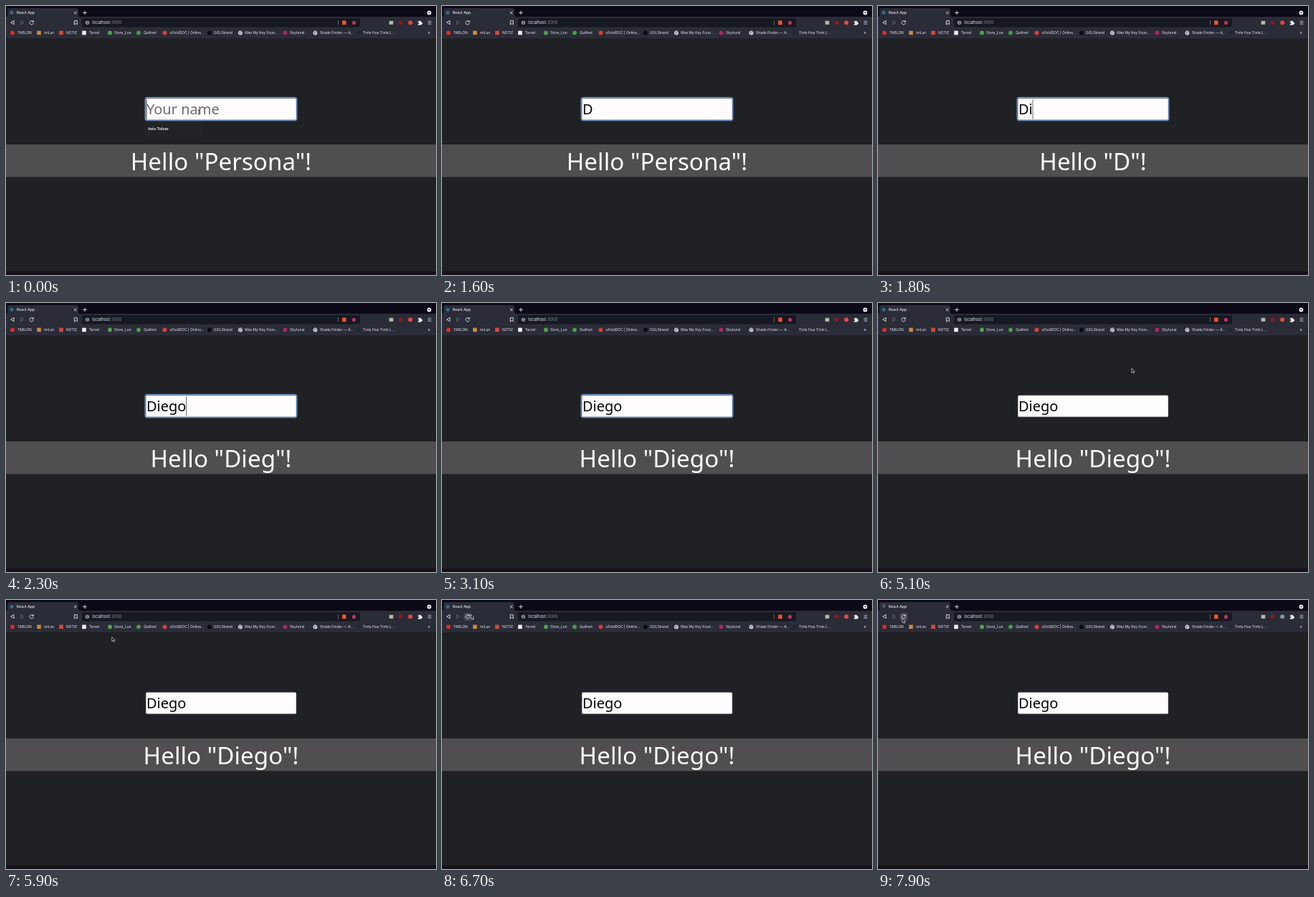
Animation, 600 px wide and 375 px high, one loop 8 s. Source, as an HTML page:

```html
<!DOCTYPE html>
<html lang="en">
<head>
<meta charset="utf-8">
<title>Greeting form</title>
<style>
  html, body { margin: 0; width: 100%; height: 100%; overflow: hidden; background: #202124; }
  svg { display: block; width: 600px; height: 375px; }
  text { white-space: pre; }
  .ui { font: 5px Inter, "Open Sans", sans-serif; fill: #eceaf1; }
  .page { font-family: "Noto Sans", "Open Sans", sans-serif; }
  .line { fill: none; stroke: #e4e3ea; stroke-width: .9; stroke-linecap: round; stroke-linejoin: round; }
</style>
</head>
<body>
<svg viewBox="0 0 600 375">
  <!-- window -->
  <rect width="600" height="375" fill="#202124"/>
  <rect y="370" width="600" height="5" fill="#17121a"/>
  <rect width="600" height="16" fill="#0d0a17"/>
  <path d="M0 45V15Q2 15 2 13V6Q2 3 5 3H98Q101 3 101 6V13Q101 15 103 15H600V45Z" fill="#2a2c38"/>
  <text class="ui" x="15" y="11.2" style="font-size:5.1px;font-weight:500">React App</text>
  <circle id="favicon" cx="8" cy="9.3" r="2.5" fill="#2e6f88"/>
  <path id="spinner" class="line" d="M8 6.3A3 3 0 0 1 11 9.3" style="stroke:#d0625c"/>
  <path class="line" d="M95.4 8l2.8 2.8m0-2.8l-2.8 2.8M107.6 9.4h4.8M110 7v4.8"/>
  <circle cx="590.5" cy="9.4" r="2.9" fill="#f1f0f5"/>
  <path d="M589 8.7h3l-1.5 1.9z" fill="#0d0a17"/>

  <!-- toolbar -->
  <rect id="backHover" x="4" y="18" width="11" height="11" rx="2" fill="#434552"/>
  <rect id="reloadHover" x="30.5" y="18" width="11" height="11" rx="2" fill="#434552"/>
  <path class="line" d="M11 20.7v5l-4-2.5z"/>
  <path class="line" d="M20.7 20.7v5l4-2.5z" style="stroke:#62646f"/>
  <path class="line" d="M37.8 21.5A2.7 2.7 0 1 0 38.3 24M38.3 20.3v1.8h-1.8"/>
  <path class="line" d="M95.7 20.6h3.6v5.2l-1.8-1.5-1.8 1.5z"/>
  <rect x="106" y="17" width="388" height="12.4" rx="2.2" fill="#171922"/>
  <circle cx="113.5" cy="23.3" r="2.7" fill="#898b94"/>
  <path d="M113.5 22.8v2M113.5 21.3v.7" stroke="#171922" stroke-width=".7"/>
  <text class="ui" x="120.3" y="25.3" style="font-size:5.8px">localhost<tspan fill="#85868f">:3000</tspan></text>
  <path d="M463.5 20v6.5" stroke="#858690" stroke-width=".7"/>
  <rect x="469.2" y="20.4" width="5.4" height="5.8" fill="#f2552c"/>
  <circle cx="485.5" cy="23.4" r="2.6" fill="#bd315f"/>
  <rect x="534.7" y="20.8" width="5.6" height="5" fill="#b9b9ab"/>
  <circle cx="550.6" cy="23.3" r="2.7" fill="#96151c"/>
  <circle id="extension" cx="564.2" cy="23.3" r="3"/>
  <path d="M574.8 21.6h1.5a1.1 1.1 0 1 1 2.2 0h1.3v1.5a1.1 1.1 0 1 1 0 2.1v1.2h-5v-1.6a1 1 0 1 0 0-1.8z" fill="#f1f0f5"/>
  <path class="line" d="M589 21.3h4M589 23.3h4M589 25.3h4" style="stroke-width:.7"/>
  <g id="bookmarks"></g>
  <text class="ui" x="588.4" y="39.2" style="font-size:6px">»</text>

  <!-- page -->
  <g id="popup">
    <rect x="194" y="160" width="79.5" height="21.5" fill="#222327" stroke="#292a2e" stroke-width=".5"/>
    <text class="ui" x="198.3" y="173" style="font-size:5.3px;font-weight:700">Inés Tolvar</text>
  </g>
  <rect id="ring" x="194" y="127.4" width="212" height="32.4" rx="2.8" fill="#245fc4" stroke="#a9c9f5" stroke-width=".7"/>
  <rect x="195.2" y="128.8" width="209.8" height="30" rx="1.6" fill="#fefcff" stroke="#77757b" stroke-width=".5"/>
  <text id="field" class="page" x="195.9" y="151.4" font-size="20"></text>
  <path id="caret" d="M0 130.5V157.5" stroke="#222" stroke-width=".7"/>
  <rect y="193" width="600" height="45.4" fill="#504e51"/>
  <text id="greeting" class="page" x="300" y="228.7" font-size="33.2" fill="#fff" text-anchor="middle"></text>

  <path id="beam" d="M-1.4-3.2Q0-3.2 0-2.2Q0-3.2 1.4-3.2M0-2.2V2.4M-1.4 3.2Q0 3.2 0 2.2Q0 3.2 1.4 3.2" fill="none" stroke="#222" stroke-width=".7"/>
  <path id="arrow" d="M0 0V6L1.4 4.8L2.4 7L3.4 6.5L2.5 4.4H4.3Z" fill="#0a0a0a" stroke="#fff" stroke-width=".6"/>
</svg>
<script>
const $ = id => document.getElementById(id);
const show = (id, on) => $(id).setAttribute('visibility', on ? 'visible' : 'hidden');
const place = (id, [x, y]) => $(id).setAttribute('transform', `translate(${x} ${y})`);

// label, text x, icon x, icon kind, colour
const bookmarks = [
  ['TABLON', 16, 9, 'dot', '#df3029'],
  ['miLun', 53, 46, 'box', '#c98b43'],
  ['NOTIZ', 84, 77, 'box', '#d84a3d'],
  ['Tarvel', 116, 109, 'box', '#f0eff0'],
  ['Store_Lun', 151, 145, 'dot', '#55a24c'],
  ['Quillnet', 192, 185, 'dot', '#48a044'],
  ['uFoldDOC | Online...', 228.5, 221.5, 'dot', '#e63a35'],
  ['GOLStrand', 290, 284, 'dot', '#090a0e'],
  ['Was My Key Foun...', 333, 327, 'globe', '#eeedf3'],
  ['Skytunel', 396, 389.5, 'dot', '#ad275b'],
  ['Shade Finder — A...', 438, 431.5, 'globe', '#eeedf3'],
  ['Tints Hue Tints L...', 498, 492, 'dot', '#232531']
];
const icons = {
  dot: (x, c) => `<circle cx="${x}" cy="37.4" r="2.9" fill="${c}"/>`,
  box: (x, c) => `<rect x="${x - 2.8}" y="34.6" width="5.6" height="5.6" fill="${c}"/>`,
  globe: (x, c) => icons.dot(x, c) +
    `<path d="M${x - 2.2} 36.2l1.8.5.3 1.2-1 .5.2 1.3M${x + .4} 35l.5 1 1.3.6m-.2 1.3l-1.1.9" fill="none" stroke="#2a2c38" stroke-width=".8"/>`
};
$('bookmarks').innerHTML = bookmarks.map(([label, tx, ix, kind, color]) =>
  icons[kind](ix, color) + `<text class="ui" x="${tx}" y="39.2">${label}</text>`).join('');

const NAME = 'Diego', KEY_TIMES = [1600, 1800, 2000, 2100, 2300];
const BLUR = 5000, RELOAD = 7700, LAG = 100;
const typed = t => NAME.slice(0, KEY_TIMES.filter(k => k <= t).length);

// pointer keys: time, x, y
const path = [
  [4600, 290, 140], [4800, 338, 108], [5000, 354, 91], [5500, 354, 91],
  [6200, 14, 26], [6400, 11, 23], [6500, 24, 36], [6700, 40.5, 20.5],
  [7100, 35, 26], [7900, 34, 25.5]
];
function pointer(t) {
  if (t < 1600) return [269, 148];
  const i = path.findIndex(p => p[0] > t);
  if (i < 0) return path.at(-1).slice(1);
  if (!i) return null;
  const [a, b] = [path[i - 1], path[i]];
  const u = (t - a[0]) / (b[0] - a[0]), e = u * u * (3 - 2 * u);
  return [1, 2].map(k => a[k] + (b[k] - a[k]) * e);
}

function caretOn(t) {
  if (t >= BLUR) return false;
  if (t < 1700) return t % 1000 < 300 || (t % 1000 >= 800 && t < 1300);
  return t < 2300 || (t - 2300) % 1000 < 500;
}

function draw(t) {
  const value = typed(t), field = $('field');
  field.textContent = value || 'Your name';
  field.setAttribute('fill', value ? '#080808' : '#6d6b6f');
  $('greeting').textContent = `Hello "${typed(t - LAG) || 'Persona'}"!`;

  const end = value ? field.getComputedTextLength() : 0;
  place('caret', [196.2 + end, 0]);
  show('caret', caretOn(t));
  show('popup', !value);
  show('ring', t < BLUR);

  const p = pointer(t), inField = p && p[1] > 128;
  show('beam', inField);
  show('arrow', p && !inField);
  if (p) { place('beam', p); place('arrow', p); }
  const over = (left, right) => p && p[1] > 17 && p[1] < 29 && p[0] > left && p[0] < right;
  show('backHover', over(4, 15));
  show('reloadHover', over(30, 42));

  const loading = t >= RELOAD;
  show('spinner', loading);
  $('spinner').setAttribute('transform', `rotate(${t * .36} 8 9.3)`);
  $('favicon').setAttribute('r', loading ? 1.7 : 2.5);
  $('extension').setAttribute('fill', loading ? '#8294a3' : '#e5483d');
}

const start = performance.now();
function tick() {
  const t = (performance.now() - start) % 8000;
  draw(Math.floor(t / 100) * 100);
  requestAnimationFrame(tick);
}
tick();
</script>
</body>
</html>
```
